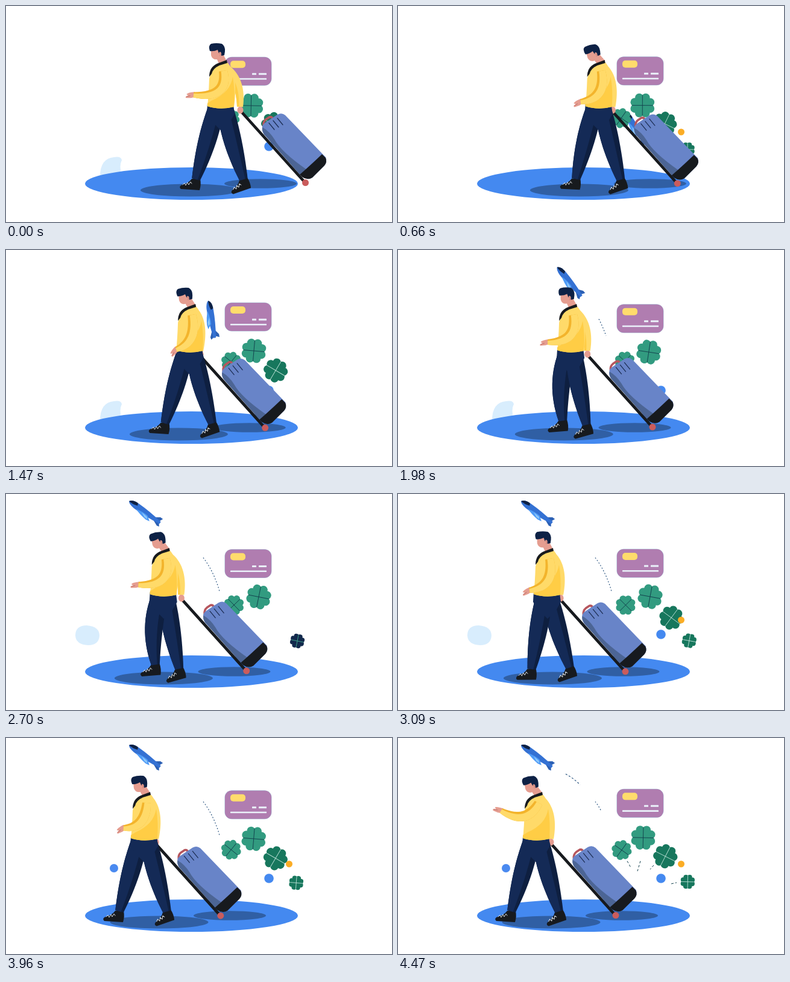
An HTML page with a canvas that plays this animation: 640x360 px, repeating every 4.5 s.

```html
<!DOCTYPE html>
<html lang="en">
<head>
<meta charset="utf-8">
<title>Traveller with suitcase</title>
<style>
  html, body { margin: 0; width: 100%; height: 100%; overflow: hidden; background: #fff; }
  canvas { display: block; width: 640px; height: 360px; }
</style>
</head>
<body>
<canvas id="stage" width="640" height="360"></canvas>
<script>
const ctx = document.getElementById('stage').getContext('2d');
const LOOP = 4500, WALK = 3600, STEP = 720, SWING = 2400;
const C = {
  floor: '#4489f0', shadow: '#305fa4', skin: '#e59d90', hair: '#0d2145', black: '#171a1e',
  shirt: '#ffda69', shirtMid: '#ffcd45', shirtDark: '#f3b42c',
  navy: '#142a56', navyDark: '#0e1f40', sky: '#d8edfd',
  bag: '#6884c8', bagDark: '#4c6595', handle: '#b6565d', wheel: '#ca5c5c'
};

const clamp = x => Math.min(1, Math.max(0, x));
const mix = (a, b, k) => a + (b - a) * k;
const ease = x => (1 - Math.cos(Math.PI * clamp(x))) / 2;
const within = (t, a, b) => t >= a && t < b;

// Interpolates rows of [time, ...values].
function track(rows, t, curve = x => x) {
  let i = 0;
  while (i < rows.length - 2 && t >= rows[i + 1][0]) i++;
  const a = rows[i], b = rows[i + 1];
  const k = curve(clamp((t - a[0]) / (b[0] - a[0])));
  return a.slice(1).map((v, j) => mix(v, b[j + 1], k));
}

function fill(d, color) {
  ctx.fillStyle = color;
  ctx.fill(new Path2D(d));
}
function line(d, color, width, dash = []) {
  ctx.strokeStyle = color;
  ctx.lineWidth = width;
  ctx.lineCap = dash.length ? 'butt' : 'round';
  ctx.lineJoin = 'round';
  ctx.setLineDash(dash);
  ctx.stroke(new Path2D(d));
  ctx.setLineDash([]);
}
function oval(x, y, rx, ry, color) {
  ctx.fillStyle = color;
  ctx.beginPath();
  ctx.ellipse(x, y, rx, ry, 0, 0, 7);
  ctx.fill();
}
function box(x, y, w, h, r, color) {
  ctx.fillStyle = color;
  ctx.beginPath();
  ctx.roundRect(x, y, w, h, r);
  ctx.fill();
}
function at(x, y, angle, draw) {
  ctx.save();
  ctx.translate(x, y);
  ctx.rotate(angle);
  draw();
  ctx.restore();
}

// Tapered limb along a quadratic curve; lo..hi picks part of its width.
function limb(a, b, c, widths, color, lo = -1, hi = 1) {
  const sides = [[], []];
  for (let i = 0; i <= 16; i++) {
    const k = i / 16, m = 1 - k;
    const x = m * m * a[0] + 2 * m * k * b[0] + k * k * c[0];
    const y = m * m * a[1] + 2 * m * k * b[1] + k * k * c[1];
    const dx = m * (b[0] - a[0]) + k * (c[0] - b[0]);
    const dy = m * (b[1] - a[1]) + k * (c[1] - b[1]);
    const n = Math.hypot(dx, dy);
    const w = (m * m * widths[0] + 2 * m * k * widths[1] + k * k * widths[2]) / 2;
    [lo, hi].forEach((s, j) => sides[j].push([x + dy / n * w * s, y - dx / n * w * s]));
  }
  fill('M' + sides[0].concat(sides[1].reverse()).join('L') + 'Z', color);
}

function clover(x, y, r, angle, leaf, vein) {
  at(x, y, angle, () => {
    for (let i = 0; i < 8; i++) {
      const a = (i + 0.5) * Math.PI / 4;
      oval(Math.cos(a) * r * 0.68, Math.sin(a) * r * 0.68, r * 0.34, r * 0.34, leaf);
    }
    oval(0, 0, r * 0.6, r * 0.6, leaf);
    const v = r * 0.82;
    line(`M${-v} 0H${v}M0 ${-v}V${v}`, vein, 0.9);
  });
}

function clovers(t, s) {
  const turn = s * 0.2, light = '#329b80', deep = '#17775d', ink = '#123f4c';
  clover(370 + 8 * s, 187 - 2 * s, 16.5, 0.6 + turn, light, ink);
  clover(405 + 14 * s, 165.5 + 6 * s, 20.5, turn, light, ink);
  if (!within(t, 1750, 3050)) clover(442 + 12 * s, 196 + 11 * s, 19.8, 0.45 + turn, deep, '#b9dfd4');
  if (!within(t, 1100, 2400)) {
    const dark = within(t, 2400, 3000);
    clover(480 + 3 * s, 239 + 6 * s, 12, turn, dark ? '#12294c' : deep, dark ? '#3ea58b' : '#b9dfd4');
  }
  if (t > 4000) line('M380 205L386 216M402 205L397 222M424 212L418 219M453 243L462 241', ink, 1, [4, 3]);
}

function card(y) {
  box(362.5, y - 0.5, 78, 48, 12, '#9fc0d8');
  box(363, y, 77, 47, 11, '#b07db0');
  box(372, y + 6, 25, 12, 5, '#ffdc6c');
  box(408, y + 26.5, 7, 3, 0.5, '#eaf1fa');
  box(419, y + 26.5, 13, 3, 0.5, '#eaf1fa');
  box(372, y + 35, 60, 2.6, 0.5, '#eaf1fa');
}

function plane(t) {
  if (t < 600) return;
  const [x, y, deg] = track([
    [600, 398, 211, 55], [1470, 341, 117, 80], [1980, 285, 54, 50], [2430, 231, 31, 35], [4500, 231, 31, 35]
  ], t);
  at(x, y, deg * Math.PI / 180, () => {
    fill('M18 -3L25 -8L30 -8L27 -1L32 6L28 7L19 3Z', '#2c60b4');
    fill('M-33 0Q-30 -6 -17 -6Q4 -6 30 -2L30 2Q0 6 -20 5Q-30 4 -33 0Z', '#3471d3');
    fill('M-16 4Q-3 1 6 2L14 8L7 9Q-6 8 -16 4Z', '#4d9af6');
    fill('M-5 3L6 4L9 7L3 7Z', '#8cc7fb');
    fill('M-33 0Q-30 -6 -19 -6L-17 -2Q-25 1 -33 0Z', '#0e2144');
  });
}

function trail(t) {
  if (t > 1750) {
    line(t > 4000 ? 'M327 106Q332 112 337 122' : t < 2250 ? 'M333 115Q340 129 345 143' : 'M327 106Q345 130 354 162',
      '#1d4a78', 1.1, [2, 3]);
  }
  if (t > 4000) line('M278 60Q291 67 302 78', '#1d4a78', 1.1, [3, 3]);
}

function backdrop(t, s) {
  if (t < 400 || within(t, 1200, 2100)) {
    fill('M156 284Q156 254 179 252Q191 250 192 257Q187 266 192 284Z', C.sky);
  }
  if (within(t, 2100, 3350)) {
    fill('M115 236Q115 219 134 219Q155 221 155 236Q154 252 136 252Q116 251 115 236Z', C.sky);
  }
  trail(t);
  plane(t);
  card(84.5 + 8 * s);
  clovers(t, s);
  if (!within(t, 1400, 3050)) oval(469.5, 210, 5.5, 5.5, '#fbad25');
  if (!within(t, 2300, 3050)) oval(436, 234, 7.8, 7.8, '#4489f0');
  if (t > 3250) oval(179, 217, 7, 7, '#4a8af0');
}

function floor(t) {
  const e = ease(t / WALK);
  oval(307.5, 296, 176.5, 27, C.floor);
  oval(304.5 - 50.5 * e, 307, 81.5, 10.5, C.shadow);
  oval(422 - 51 * e, 296, 60, 7.8, C.shadow);
}

function suitcase() {
  line('M427 200Q426 193 431 189L437 185Q441 184 443 189', C.handle, 3.6);
  fill('M425 203Q424 198 432 193L450 181Q457 177 463 182L530 252Q533 260 528 266L508 286Q500 291 492 285L428 214Q424 208 425 203Z', C.bag);
  fill('M425 202Q437 209 445 222Q456 243 499 273L488 282L428 214Q424 208 425 202Z', C.bagDark);
  fill('M524 247L530 253Q533 260 528 266L508 286Q500 291 491 285L487 281Q502 268 524 247Z', C.black);
  line('M436 195L445 206M443 191L452 202M450 187L459 198', '#1a2b50', 1.2);
  line('M390 176L493 291', C.black, 4.8);
  oval(496.5, 294.5, 5.5, 5.5, C.wheel);
}

function shoe(x, y, angle) {
  at(x, y, angle, () => {
    fill('M-7 -2L7 -2Q9 8 6 17L-25 15Q-30 10 -21 7Q-12 5 -7 -2Z', C.black);
    line('M-22 8L-19 5L-17 9L-14 4L-12 8L-9 3L-7 6', '#e8edf2', 0.9);
  });
}

function leg(hip, swinging, p) {
  const s = swinging ? ease((p - 0.39) / 0.61) : 1 - ease(p);
  const arc = Math.sin(Math.PI * s);
  const lift = swinging ? arc : 0;
  const foot = [mix(394, 315, s), 289 + arc * (swinging ? -5 : 5)];
  const knee = [(hip + foot[0]) / 2 + mix(-5, 3, s) - 15 * lift, 222];
  const top = [hip, 168];
  const widths = [26, 39, 14];
  shoe(foot[0], foot[1] + 1, mix(-0.4, 0, s));
  limb(top, knee, foot, widths, C.navyDark);
  limb(top, knee, foot, widths, C.navy, -1, 0.4);
}

function legs(t) {
  const n = t < WALK ? Math.floor(t / STEP) : 5;
  const p = t < WALK ? t / STEP % 1 : 0;
  // Hips trade sides as the feet pass each other.
  const pair = [
    () => leg(mix(349, 363, ease(p)), false, p),
    () => leg(mix(363, 349, ease(p)), true, p)
  ];
  if (n % 2 === 0) pair.reverse();
  pair.forEach(draw => draw());
  fill('M334 164H377L379 180L371 194L357 208L343 194L333 180Z', C.navy);
}

function head(t) {
  const [lean] = track([
    [0, 0], [660, -7], [1470, -3], [1980, -1], [2700, -5], [3480, 4], [4200, -5], [4500, -5]
  ], t, ease);
  at(357, 93, lean / 27, () => {
    ctx.translate(-357, -93);
    fill('M340 72L340 82Q342 90 350 89L353 96L367 94L361 82L360 72Z', C.skin);
    fill('M338 75Q335 66 340 63Q349 61 358 63Q364 67 363 76L362 82L357 83L357 78Q354 74 353 79L351 73Q345 76 338 75Z', C.hair);
    line('M354 78Q357 79 355 83', '#c77f76', 1);
  });
}

function frontArm(c, u) {
  const a = [360, 108];
  const b = [mix(369, 340, u), mix(154, 146, u)];
  const w = [mix(324 - 13 * c, 298, u), mix(158 - 10 * c, 121, u)];
  const droop = ((1 - c) / 2) ** 2;
  at(w[0], w[1], mix(2.88 - 0.95 * droop, 3.3, u), () => {
    fill('M-3 -4L5 -4L13 -2Q15 0 12 1L9 1L11 4Q8 6 -3 4Z', C.skin);
    line('M6 0L12 0', '#b96b68', 0.8);
  });
  limb(a, b, w, [14, 22, 9], C.shirtDark, -1, 1);
  limb(a, b, w, [14, 22, 9], C.shirt, -0.5, 1);
}

function backArm(c) {
  const a = [367, 105], b = [384 + 6 * c, 126], w = [380 + 8 * c, 168];
  oval(w[0] + 0.5, 173.5, 5, 6, C.skin);
  limb(a, b, w, [13, 17, 10], C.shirt);
  limb(a, b, w, [13, 17, 10], C.shirtMid, -1, -0.3);
}

function man(t, c, u) {
  backArm(mix(c, 0, u));
  legs(t);
  head(t);
  fill('M353 96Q341 103 337 121Q336 150 334 167Q355 174 378 168Q381 148 380 128Q377 104 366 93Z', C.shirt);
  fill('M376 118Q372 144 342 157L334 162L334 167Q355 174 378 168Q380 140 376 118Z', C.shirtMid);
  fill('M337 118Q337 102 350 96L366 90L367 95L354 99Q343 104 341 113Z', C.black);
  frontArm(c, u);
}

function draw(t) {
  const sway = (1 - Math.cos(2 * Math.PI * (t - 450) / LOOP)) / 2;
  const walk = Math.min(t, WALK);
  const dx = -127 * walk / WALK;
  const c = Math.cos(2 * Math.PI * walk / SWING);
  const u = ease((t - WALK) / 840);
  const pull = 8.5 * (mix(c, 0, u) - 1);

  ctx.clearRect(0, 0, 640, 360);
  backdrop(t, sway);
  floor(t);
  at(dx + pull, -pull / 8, 0, suitcase);
  at(dx, 0, 0, () => man(t, c, u));
}

const start = performance.now();
function tick() {
  draw((performance.now() - start) % LOOP);
  requestAnimationFrame(tick);
}
tick();
</script>
</body>
</html>
```
